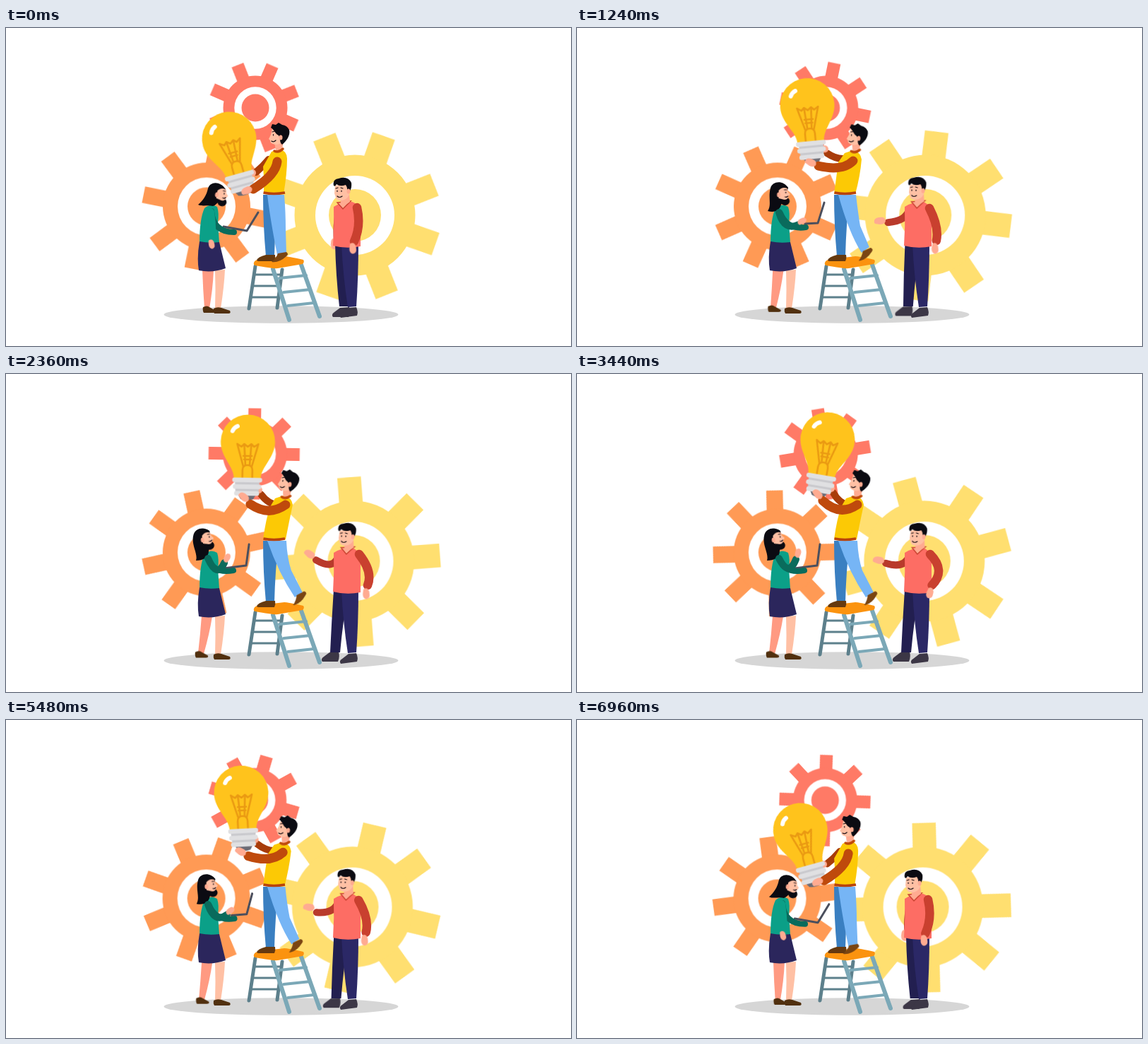
An HTML page without scripts for the animation above (7000 ms loop, 800 px wide and 450 px high).

```html
<!DOCTYPE html>
<html lang="en">
<head>
<meta charset="utf-8">
<title>Teamwork</title>
<style>
html,body{margin:0;width:100%;height:100%;overflow:hidden;background:#fff}
svg{display:block;width:100vw;height:100vh}
.line{fill:none;stroke-linecap:round;stroke-linejoin:round}
.skin{fill:#ffab91}
.pale{fill:#ffc0a4}
.ink{fill:#0b0b12}
.feat{fill:none;stroke:#1a1016;stroke-width:1.2;stroke-linecap:round}

/* gears turn one way and cut back; the teeth sit slightly off the discs */
.teeth,.disc{animation:7s linear infinite}
.hole{fill:#fff}
.big .teeth{stroke:#ffdf70;animation-name:bigTeeth}
.big .disc{fill:#ffdf70;animation-name:bigDisc}
.mid .teeth{stroke:#ff9a55;animation-name:midTeeth}
.mid .disc{fill:#ff9a55;animation-name:midDisc}
.small .teeth{stroke:#ff7a66;animation-name:smallTeeth}
.small .disc{fill:#ff7a66;animation-name:smallDisc}
@keyframes bigTeeth{from{transform:translate(495px,266px) rotate(21.4deg)}to{transform:translate(494.5px,265.5px) rotate(-49deg)}}
@keyframes bigDisc{from{transform:translate(494px,265px)}to{transform:translate(489.5px,264.5px)}}
@keyframes midTeeth{from{transform:translate(282px,253.5px) rotate(10deg)}to{transform:translate(281.5px,254px) rotate(81.5deg)}}
@keyframes midDisc{from{transform:translate(284px,252.5px)}to{transform:translate(283.5px,252.5px)}}
@keyframes smallTeeth{from{transform:translate(351.5px,112.5px) rotate(23.5deg)}to{transform:translate(351px,114px) rotate(-43.4deg)}}
@keyframes smallDisc{from{transform:translate(353px,113px)}to{transform:translate(351.3px,113.5px)}}

/* people swing between two poses */
.m{animation:3.5s linear infinite alternate}
.c{transform-box:fill-box;transform-origin:center}

.bulb{animation-name:bulb}
@keyframes bulb{
0%{transform:translate(316px,157px) rotate(-15.6deg);animation-timing-function:cubic-bezier(.3,.2,.6,.78)}
35.4%{transform:translate(326px,109.5px) rotate(-5.5deg)}
43.4%{transform:translate(333px,103px) rotate(-3deg)}
67.4%{transform:translate(342.5px,96px) rotate(1deg)}
76.6%{transform:translate(346.5px,95px) rotate(4deg)}
100%{transform:translate(355.5px,92.5px) rotate(10deg)}}

.headA{animation-name:headA}
@keyframes headA{
0%{transform:none;animation-timing-function:cubic-bezier(.3,.2,.6,.78)}
36%{transform:translate(10px,1px) rotate(5deg)}
68%,100%{transform:translate(13px,1px) rotate(8deg)}}
.vest{animation-name:vest}
@keyframes vest{
0%{d:path("M376 175L387 171Q398 174 398 185Q398 206 393 235L365 235Q366 215 364 196Z");animation-timing-function:cubic-bezier(.3,.2,.6,.78)}
36%{d:path("M379 177L391 173Q402 176 403 186Q401 210 394 235L364 235Q368 205 370 190Z")}
68%,100%{d:path("M381 176L393 172Q405 175 406 185Q401 208 396 234L364 234Q368 205 374 188Z")}}
.armA{animation-name:armA}
@keyframes armA{
0%{d:path("M384 189Q382 208 350 228");animation-timing-function:cubic-bezier(.3,.2,.6,.78)}
36%{d:path("M391 188Q376 203 342 195")}
68%{d:path("M396 185Q372 202 346 184")}
100%{d:path("M397 185Q372 202 348 179")}}
.handA{animation-name:handA}
@keyframes handA{
0%{transform:translate(341px,230px) rotate(-20deg);animation-timing-function:cubic-bezier(.3,.2,.6,.78)}
36%{transform:translate(331px,190px) rotate(28deg)}
68%{transform:translate(337px,174px) rotate(45deg)}
100%{transform:translate(341px,170px) rotate(50deg)}}
.farA{animation-name:farA}
@keyframes farA{
0%{d:path("M372 186Q364 196 354 204");animation-timing-function:cubic-bezier(.3,.2,.6,.78)}
36%{d:path("M384 184Q370 188 354 177")}
68%{d:path("M386 186Q371 184 361 170")}
100%{d:path("M386 186Q372 184 363 168")}}
.palmA{animation-name:palmA}
@keyframes palmA{
0%{transform:translate(349px,205px);animation-timing-function:cubic-bezier(.3,.2,.6,.78)}
36%{transform:translate(351px,171px)}
68%{transform:translate(358px,164px)}
100%{transform:translate(360px,162px)}}
.legA{animation-name:legA}
@keyframes legA{
0%{d:path("M370 236L394 236Q396 262 396 285L397 318L384 321Q374 270 370 236Z");animation-timing-function:cubic-bezier(.3,.2,.6,.78)}
36%{d:path("M370 236L395 236Q398 262 401 280L414 310L403 318Q385 290 370 236Z")}
68%,100%{d:path("M370 236L397 236Q398 260 404 278L420 309L409 316Q386 282 370 236Z")}}
.shoeA{animation-name:shoeA}
@keyframes shoeA{
0%{transform:none;animation-timing-function:cubic-bezier(.3,.2,.6,.78)}
36%{transform:translate(21px,-4px) rotate(-14deg)}
68%,100%{transform:translate(28px,-7px) rotate(-18deg)}}

.hairB{animation-name:hairB}
@keyframes hairB{
0%{d:path("M311 228C303 216 289 217 286 227C284 237 279 244 272 250C278 253 286 250 293 252C300 250 305 240 311 228Z");animation-timing-function:cubic-bezier(.3,.2,.6,.78)}
36%{d:path("M299 226C292 215 277 216 274 226C270 240 276 250 270 259C280 262 287 258 289 250C293 244 296 236 299 226Z")}
68%,100%{d:path("M288 222C281 216 267 217 265 229C262 242 272 254 269 264C279 264 287 260 287 250C289 244 291 234 288 222Z")}}
.faceB{animation-name:faceB}
@keyframes faceB{
0%{transform:translate(12px,1px) rotate(10deg);animation-timing-function:cubic-bezier(.3,.2,.6,.78)}
36%{transform:translate(-.5px,0)}
68%,100%{transform:translate(-7.5px,-2px) rotate(-8deg)}}
.armB{animation-name:armB}
@keyframes armB{
0%{d:path("M290 260Q293 280 292 296");stroke:#0ba088;animation-timing-function:cubic-bezier(.3,.2,.6,.78)}
36%{d:path("M286 261Q294 288 314 278");stroke:#0a6b5c}
68%{d:path("M286 261Q299 290 309 267");stroke:#0a6b5c}
100%{d:path("M286 261Q300 288 310 262");stroke:#0a6b5c}}
.handB{animation-name:handB}
@keyframes handB{
0%{transform:translate(291px,306px) rotate(80deg);animation-timing-function:cubic-bezier(.3,.2,.6,.78)}
36%{transform:translate(319px,273px) rotate(-25deg)}
68%{transform:translate(313px,260px) rotate(-60deg)}
100%{transform:translate(313px,253px) rotate(-75deg)}}
.farB{animation-name:farB}
@keyframes farB{
0%{d:path("M291 259Q293 289 323 289");animation-timing-function:cubic-bezier(.3,.2,.6,.78)}
36%{d:path("M288 262Q298 286 324 282")}
68%,100%{d:path("M287 262Q294 283 322 278")}}
.laptop{animation-name:laptop}
@keyframes laptop{
0%{d:path("M308 281L341 287L357 261");animation-timing-function:cubic-bezier(.3,.2,.6,.78)}
36%{d:path("M323 277L341 276L350 247")}
68%,100%{d:path("M308 275L340 271L344 241")}}
.legB{animation-name:legB}
@keyframes legB{
0%{d:path("M278 342L294 343Q293 368 288 397L281 397Q279 370 278 342Z");animation-timing-function:cubic-bezier(.3,.45,.6,1)}
64%,100%{d:path("M277 342L292 343Q288 368 280 396L272 395Q275 370 277 342Z")}}
.shoeB{animation-name:shoeB}
@keyframes shoeB{
0%{transform:none;animation-timing-function:cubic-bezier(.3,.45,.6,1)}
64%,100%{transform:translate(-11px,-1.5px)}}

.headC{animation-name:headC}
@keyframes headC{
0%{transform:none;animation-timing-function:cubic-bezier(.3,.2,.6,.78)}
36%{transform:translate(5px,-1px) rotate(2deg)}
68%,100%{transform:translate(6px,-1px) rotate(3deg)}}
.armC{animation-name:armC}
@keyframes armC{
0%{d:path("M497 254Q503 280 493 302");animation-timing-function:cubic-bezier(.3,.2,.6,.78)}
36%{d:path("M499 255Q513 282 509 301")}
68%{d:path("M500 255Q520 280 512 299")}
100%{d:path("M500 255Q523 278 502 299")}}
.handC{animation-name:handC}
@keyframes handC{
0%{transform:translate(491px,312px);animation-timing-function:cubic-bezier(.3,.2,.6,.78)}
36%{transform:translate(507px,312px)}
68%{transform:translate(510px,311px)}
100%{transform:translate(499px,310px) rotate(20deg)}}
.farC{animation-name:farC}
@keyframes farC{
0%{d:path("M472 256Q467 280 469 299");animation-timing-function:cubic-bezier(.3,.2,.6,.78)}
36%{d:path("M470 257Q466 273 440 275")}
68%{d:path("M470 258Q464 278 439 263")}
100%{d:path("M470 258Q463 276 437 268")}}
.palmC{animation-name:palmC}
@keyframes palmC{
0%{transform:translate(465px,305px) rotate(-80deg);animation-timing-function:cubic-bezier(.3,.2,.6,.78)}
35.4%{transform:translate(429px,273px)}
43.4%{transform:translate(429px,265px) rotate(12deg)}
67.4%{transform:translate(430px,255px) rotate(38deg)}
100%{transform:translate(427px,264px) rotate(12deg)}}
.legC{animation-name:legC}
@keyframes legC{
0%{d:path("M466 305L488 305Q486 350 485 394L472 394Q467 350 466 305Z");animation-timing-function:cubic-bezier(.3,.45,.6,1)}
64%,100%{d:path("M464 305L485 305Q477 350 473 394L459 394Q461 350 464 305Z")}}
.shoeC{animation-name:shoeC}
@keyframes shoeC{
0%{transform:none;animation-timing-function:cubic-bezier(.3,.45,.6,1)}
64%,100%{transform:translate(-15px,-2px)}}
</style>
</head>
<body>
<svg viewBox="0 0 800 450">
<defs>
  <path id="hand" d="M-8-1Q-6-5 0-5Q7-6 8 0Q7 5 0 5L-7 4Q-9 2-8-1Z"/>
  <path id="bigCross" d="M-120 0H120M0-120V120" stroke-width="33.5"/>
  <path id="midCross" d="M-89 0H89M0-89V89" stroke-width="23.5"/>
  <path id="smallCross" d="M-64.5 0H64.5M0-64.500V64.500" stroke-width="18"/>
</defs>

<g class="big">
  <g class="teeth"><use href="#bigCross" transform="rotate(-2)"/><use href="#bigCross" transform="rotate(47)"/></g>
  <g class="disc"><circle r="85.5"/><circle class="hole" r="56"/><circle r="37"/></g>
</g>
<g class="mid">
  <g class="teeth"><use href="#midCross" transform="rotate(1.5)"/><use href="#midCross" transform="rotate(43.5)"/></g>
  <g class="disc"><circle r="62"/><circle class="hole" r="41"/><circle r="27"/></g>
</g>
<g class="small">
  <g class="teeth"><use href="#smallCross"/><use href="#smallCross" transform="rotate(45)"/></g>
  <g class="disc"><circle r="45.5"/><circle class="hole" r="29.7"/><circle r="19.5"/></g>
</g>

<ellipse cx="389.5" cy="405.5" rx="166" ry="12.3" fill="#d6d6d6"/>

<!-- ladder -->
<g class="line" stroke="#5d808c">
  <path stroke-width="3.2" d="M353 349H389M351 365H388M348 381H386"/>
  <path stroke-width="5" d="M353 337L344 397M391 342L384 396"/>
</g>
<g class="line" stroke="#7ba8b7">
  <path stroke-width="4" d="M387 354L425 350M393 374L431 370M399 393L436 389"/>
  <path stroke-width="6" d="M378 341L401 413M418 335L444 408"/>
</g>
<path fill="#fb930f" d="M351 332Q352 328 360 327L394 323Q399 323 421 328Q423 331 420 334L385 340Q379 341 353 336Q350 335 351 332Z"/>

<!-- man on the ladder -->
<path class="line m farA" stroke="#a83c0a" stroke-width="10" d="M372 186Q364 196 354 204"/>
<g class="m palmA"><circle class="skin" r="5"/></g>

<g class="m bulb">
  <path fill="#6b6b75" d="M-13 74H13L9 81Q0 84-9 81Z"/>
  <path fill="#ffc31c" d="M-19 52C-19 35-38.5 22-38.5 0A38.5 38.5 0 0 1 38.5 0C38.5 22 19 35 19 52Z"/>
  <g class="line" stroke="#ea9a12" stroke-width="2.6">
    <path d="M-7 51V40Q-7 33 0 33Q7 33 7 40V51"/>
    <path d="M-6 35L-15 3L-9 7L-5 3L0 7L5 3L9 7L15 3L6 35M-3 33L-5 4M3 33L5 4M-6 20H6M-5 25H5"/>
  </g>
  <path class="line" stroke="#fff" stroke-width="6" d="M-22-15Q-20-20-15-22"/>
  <path fill="#c9c9cd" d="M-18 51H18L16 76H-16Z"/>
  <g class="line" stroke="#e0e0e2" stroke-width="6.5"><path d="M-18 54H18M-17 63.5H17M-15 73H14"/></g>
</g>

<path fill="#3a7fc1" d="M364 236L386 236Q381 280 380 323L368 323Q364 280 364 236Z"/>
<path fill="#65390f" d="M355 329Q356 324 368 321L381 321Q382 326 380 330L357 330Z"/>
<path class="m legA" fill="#76b5f5" d="M370 236L394 236Q396 262 396 285L397 318L384 321Q374 270 370 236Z"/>
<path class="m c shoeA" fill="#7a4512" d="M376 331Q383 325 385 319L397 317Q401 320 397 323Q386 333 376 331Z"/>
<path class="m vest" fill="#fcc905" d="M376 175L387 171Q398 174 398 185Q398 206 393 235L365 235Q366 215 364 196Z"/>
<path fill="none" stroke="#b8430c" stroke-width="3.5" d="M364.500 233Q379 236 395 233"/>
<g class="m c headA">
  <path class="skin" d="M380 161L393 160L391 172L382 174Z"/>
  <path class="line" stroke="#bf4a0c" stroke-width="3.5" d="M380 174Q386 177 392 171"/>
  <path class="pale" d="M377 142L389 144L392 160Q386 167 378 164Q374 163 374 159L372 157L375 151Z"/>
  <path class="ink" d="M375 141L377 136L382 137L386 134L391 137Q398 138 401 144C403 152 397 160 391 165C387 162 389 157 386 152C381 150 381 145 375 141Z"/>
  <ellipse class="skin" cx="389" cy="155" rx="2.5" ry="3.5"/>
  <path class="feat" d="M377 147L381 146M378.5 150.5V152M376 160Q379 162 382 159"/>
</g>
<path class="line m armA" stroke="#bf4a0c" stroke-width="13" d="M384 189Q382 208 350 228"/>
<g class="m handA"><use href="#hand" class="skin"/></g>

<!-- woman -->
<path class="m legB" fill="#ff9a82" d="M278 342L294 343Q293 368 288 397L281 397Q279 370 278 342Z"/>
<path class="m shoeB" fill="#51300f" d="M279 395Q285 392 288 395L297 400Q298 403 294 403H280Q278 400 279 395Z"/>
<path class="pale" d="M296 343L310 342Q309 365 304 397L296 397Q297 370 296 343Z"/>
<path fill="#51300f" d="M294 397Q299 394 305 396L317 400Q319 404 315 404H295Q293 401 294 397Z"/>
<path class="line m laptop" stroke="#4b4f5d" stroke-width="3" d="M308 281L341 287L357 261"/>
<path fill="#0ba088" d="M281 255Q290 247 299 253Q302 262 300 275L302 304H274Q274 270 281 255Z"/>
<path fill="#2b265c" d="M274 302Q288 305 302 303L311 340Q292 347 273 343Q270 325 274 302Z"/>
<path class="line m farB" stroke="#0a6b5c" stroke-width="8" d="M291 259Q293 289 323 289"/>
<path class="m hairB ink" d="M311 228C303 216 289 217 286 227C284 237 279 244 272 250C278 253 286 250 293 252C300 250 305 240 311 228Z"/>
<g class="m c faceB">
  <ellipse class="ink" cx="295" cy="245" rx="6.5" ry="6"/>
  <path class="pale" d="M286 230Q291 224 298 227L299 232L302 235L300 238Q299 243 294 243L286 241Z"/>
  <ellipse class="skin" cx="286" cy="236" rx="2.5" ry="3.5"/>
  <path class="feat" d="M294 229L297 229M296 232V233.5M295 239Q297 240 299 238"/>
</g>
<path class="line m armB" stroke="#0ba088" stroke-width="10" d="M290 260Q293 280 292 296"/>
<g class="m handB"><use href="#hand" class="skin" transform="scale(.82)"/></g>

<!-- man on the right -->
<path class="line m farC" stroke="#b93a2b" stroke-width="10" d="M472 256Q467 280 469 299"/>
<g class="m palmC"><use href="#hand" class="skin"/></g>
<path class="m shoeC" fill="#3c3746" d="M473 396L486 395Q488 403 485 409H463Q460 405 465 402Z"/>
<path class="m legC" fill="#221f50" d="M466 305L488 305Q486 350 485 394L472 394Q467 350 466 305Z"/>
<path fill="#3c3746" d="M485 396L496 395Q499 402 497 407L474 410Q471 406 476 403Z"/>
<path fill="#2b2866" d="M475 305H499Q499 352 496 394L484 395Q477 350 475 305Z"/>
<path fill="#fd6d64" d="M464 253Q474 246 490 246Q503 250 502 270L502 309Q482 313 463 308Q465 280 464 253Z"/>
<g class="m c headC">
  <path class="skin" stroke="#c9402f" stroke-width="1.5" d="M469 247L477 256L488 245Z"/>
  <path class="skin" d="M473 238L486 234L487 246Q480 252 474 248Z"/>
  <path class="pale" d="M466 223L484 220L486 236Q482 244 474 244Q468 244 467 240L465 234Z"/>
  <path class="ink" d="M464 223Q462 214 471 213Q484 209 489 219Q490 227 486 232L483 231Q484 226 481 222Q473 225 468 221Q466 225 464 223Z"/>
  <ellipse class="skin" cx="485" cy="231" rx="2.5" ry="3.5"/>
  <path class="feat" d="M467 227L470 226M474 226L477 227M469 230V231.5M475 230V231.5M469 238Q472 241 476 238"/>
</g>
<path class="line m armC" stroke="#c9402f" stroke-width="12.5" d="M497 254Q503 280 493 302"/>
<g class="m handC"><use href="#hand" class="skin" transform="rotate(90) scale(.95)"/></g>
</svg>
</body>
</html>
```
